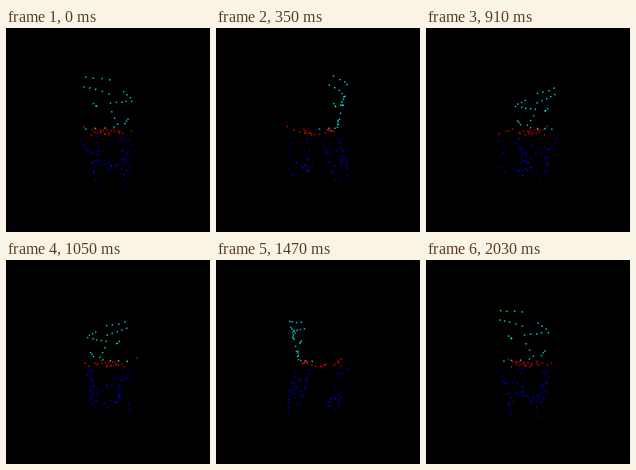
Recreate the animation shown at these times as an HTML page with a canvas. Size 256x256 px, loop 2100 ms.

```html
<!DOCTYPE html>
<html lang="en">
<head>
<meta charset="utf-8">
<title>Rotating chair point cloud</title>
<style>
  html, body { margin: 0; width: 100%; height: 100%; overflow: hidden; background: #000; }
  canvas { display: block; width: 256px; height: 256px; }
</style>
</head>
<body>
<canvas id="stage" width="256" height="256"></canvas>
<script>
const ctx = document.getElementById('stage').getContext('2d');
const SIZE = 256, STEP_MS = 70, STEPS = 30;
const CAMERA = 240, CX = 128, CY = 128.5, DOT = 0.9;

let seed = 7;
function random() {
  seed = (seed * 16807) % 2147483647;
  return seed / 2147483647;
}

// Evenly spaced points from a to b, each shifted by a seeded jitter.
function row(count, a, b, jitter) {
  return Array.from({ length: count }, (_, i) => {
    const t = i / (count - 1);
    return a.map((v, k) => v + (b[k] - v) * t + (random() - 0.5) * jitter);
  });
}

// The back rest leans and bulges: its depth follows from x and y.
function backRow(count, a, b) {
  return row(count, a, b, 1.5).map(([x, y]) =>
    [x, 24 - 0.265 * y - 0.015 * x * x - 0.1 * x, y]);
}
const seatRow = (count, a, b) => row(count, a, b, 2);
const leg = (count, a, b) => row(count, a, b, 9);

// Points are [x, depth towards the viewer, y], relative to the turning axis.
const legs = [
  leg(14, [-26, 20, 13], [-12, 32, 54]),
  leg(14, [25, 20, 11], [18, 34, 56]),
  leg(8, [-12, -34, 12], [-20, -22, 56]),
  leg(9, [21, -32, 10], [17, -27, 53]),
  leg(8, [-10, -20, 50], [8, -16, 48]),
  leg(8, [-12, 28, 24], [16, 28, 42])
];

const seat = [
  seatRow(7, [-14, 20, -1], [13, 15, 1]),
  seatRow(5, [-18, -5, 1.5], [1, -6.5, 6]),
  seatRow(4, [-32, -22, -5], [1, -20, 4.5]),
  seatRow(3, [8, -27.5, -2.5], [21.6, -33, 4]),
  seatRow(4, [-20, 4, 6], [29.5, 4, 2])
];

const back = [
  backRow(4, [-24, -57], [2, -54]),
  backRow(5, [-27, -48.5], [1, -39.5]),
  backRow(3, [17, -43], [25, -38]),
  backRow(3, [-16, -29.5], [-12, -26]),
  backRow(5, [3, -30.5], [27, -33]),
  backRow(3, [3.5, -21], [11, -7]),
  backRow(3, [19, -8], [23, -13]),
  backRow(4, [-25.7, -1], [7, -4])
];

const parts = [
  { color: '#0000e0', points: legs.flat() },
  { color: '#f00000', points: seat.flat() },
  { color: '#00f4f4', points: back.flat() }
];

function draw(angle) {
  const c = Math.cos(angle), s = Math.sin(angle);
  ctx.fillStyle = '#000';
  ctx.fillRect(0, 0, SIZE, SIZE);
  for (const { color, points } of parts) {
    ctx.fillStyle = color;
    for (const [x, z, y] of points) {
      const scale = CAMERA / (CAMERA - (z * c - x * s));
      ctx.beginPath();
      ctx.arc(CX + (x * c + z * s) * scale, CY + y * scale, DOT, 0, 2 * Math.PI);
      ctx.fill();
    }
  }
}

function tick() {
  const step = Math.floor(performance.now() / STEP_MS) % STEPS;
  draw(step / STEPS * 2 * Math.PI);
  requestAnimationFrame(tick);
}
tick();
</script>
</body>
</html>
```
